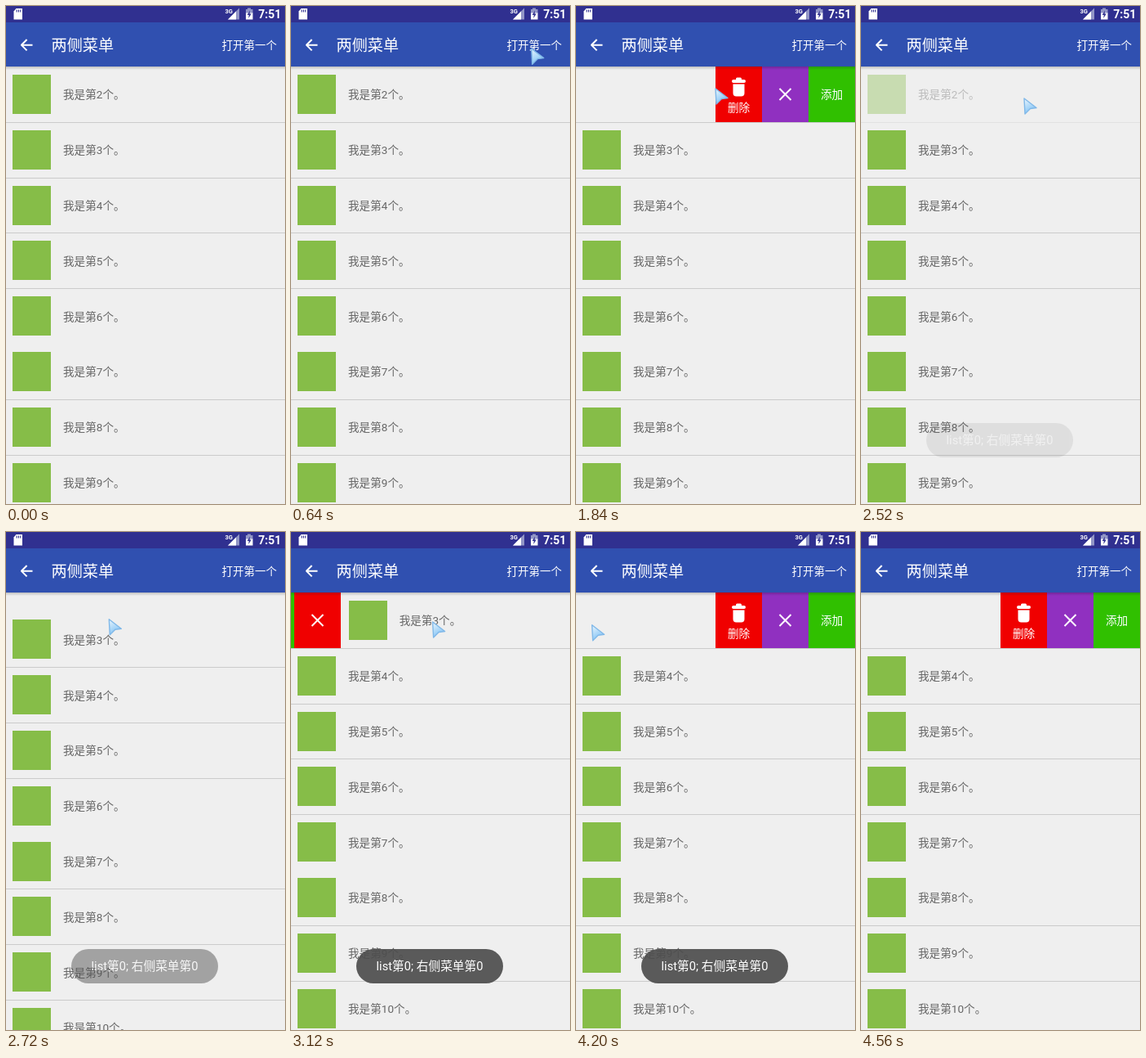
Recreate the animation shown at these times as an HTML page with a canvas. Size 342 px wide and 609 px high, loop 4.76 s.

```html
<!DOCTYPE html>
<html lang="zh-CN">
<head>
<meta charset="utf-8">
<title>两侧菜单</title>
<style>
  html, body { margin: 0; width: 100%; height: 100%; overflow: hidden; background: #efefef; }
  canvas { position: absolute; left: 0; top: 0; width: 342px; height: 609px; }
  #toast {
    position: absolute; left: 80px; top: 510px; width: 180px; height: 42px;
    border-radius: 21px; background: rgba(78, 78, 78, .92); color: #fff;
    font: 14.7px/42px Roboto, "Noto Sans CJK SC", sans-serif;
    text-align: center; white-space: nowrap; opacity: 0;
  }
</style>
</head>
<body>
<canvas id="stage"></canvas>
<div id="toast">list第0; 右侧菜单第0</div>
<script>
const W = 342, H = 609, LOOP = 4760, STEP = 40;
const BAR = 20, TOP = 74, PITCH = 67.8, BTN = 57;
const OPEN_LEFT = 2 * BTN + 2, OPEN_RIGHT = 3 * BTN;
const FONT = 'Roboto, "Noto Sans CJK SC", sans-serif';
const RED = '#f00000', PURPLE = '#9030c0', GREEN = '#30c000';

const canvas = document.getElementById('stage');
const toast = document.getElementById('toast');
const ctx = canvas.getContext('2d');
const dpr = window.devicePixelRatio || 1;
canvas.width = W * dpr;
canvas.height = H * dpr;

const clamp = (v, lo = 0, hi = 1) => Math.max(lo, Math.min(hi, v));
const span = (t, a, b) => clamp((t - a) / (b - a));
const easeOut = u => 1 - (1 - u) ** 3;
const smooth = u => (1 - Math.cos(Math.PI * u)) / 2;

// Pointer gestures: begin, end, destination
const MOVES = [
  [280, 760, 293, 50], [1400, 1680, 132, 110], [1680, 1840, 170, 100],
  [2080, 2200, 199, 112], [2560, 2960, 105, 104], [3050, 3560, 294, 118],
  [3660, 3760, 303, 118], [3840, 4560, -22, 112]
];

function pointerAt(t) {
  let x = 339, y = 123;
  for (const [a, b, toX, toY] of MOVES) {
    const u = easeOut(span(t, a, b));
    x += (toX - x) * u;
    y += (toY - y) * u;
  }
  return [x, y];
}

// Shift of the first row: taps run on their own, drags follow the pointer
function swipeAt(t) {
  const [x] = pointerAt(t);
  if (t < 3040) return OPEN_RIGHT * (easeOut(span(t, 2420, 2480)) - easeOut(span(t, 1010, 1210)));
  if (t < 3660) return clamp(x - 110, 0, OPEN_LEFT);
  if (t < 3840) return OPEN_LEFT * (1 - easeOut(span(t, 3660, 3840)));
  return clamp(x - 290, -OPEN_RIGHT, 0);
}

function text(str, x, y, size, color, align = 'left', weight = 400) {
  ctx.font = `${weight} ${size}px ${FONT}`;
  ctx.fillStyle = color;
  ctx.textAlign = align;
  ctx.fillText(str, x, y);
}

function rect(x, y, w, h, color) {
  ctx.fillStyle = color;
  ctx.fillRect(x, y, w, h);
}

function shape(points, color) {
  ctx.beginPath();
  points.forEach(([x, y]) => ctx.lineTo(x, y));
  ctx.closePath();
  ctx.fillStyle = color;
  ctx.fill();
}

function lines(segments, width) {
  ctx.beginPath();
  for (const [x1, y1, x2, y2] of segments) {
    ctx.moveTo(x1, y1);
    ctx.lineTo(x2, y2);
  }
  ctx.strokeStyle = '#fff';
  ctx.lineWidth = width;
  ctx.stroke();
}

const cross = (x, y) => lines([[x - 7, y - 7, x + 7, y + 7], [x + 7, y - 7, x - 7, y + 7]], 2);
const plus = (x, y) => lines([[x - 8, y, x + 8, y], [x, y - 8, x, y + 8]], 2);

function trash(x, y) {
  ctx.fillStyle = '#fff';
  ctx.beginPath();
  ctx.roundRect(x - 8.5, y + 2.5, 17, 4, 2);
  ctx.roundRect(x - 3.5, y, 7, 4, 1.5);
  ctx.roundRect(x - 7, y + 8, 14, 15, [0, 0, 4, 4]);
  ctx.fill();
}

function row(n, y, dx = 0) {
  rect(Math.round(8 + dx), Math.round(y + 10), 47, 48, '#86bd48');
  text(`我是第${n}个。`, 70 + dx, y + 39.4, 13.6, '#666');
}

function button(x, color) {
  rect(x, TOP, BTN, 68, color);
  return x + BTN / 2;
}

function rightMenu(x, press) {
  const bin = button(x, RED);
  if (press) button(x, `rgba(255,255,255,${0.15 * press})`);
  trash(bin, 87.5);
  text('删除', bin, 128.7, 13.6, '#fff', 'center');
  cross(button(x + BTN, PURPLE), 108);
  text('添加', button(x + 2 * BTN, GREEN), 113, 13.6, '#fff', 'center');
}

function leftMenu(edge) {
  plus(button(edge - 2 * BTN, GREEN), 108);
  cross(button(edge - BTN, RED), 108);
}

function list(t) {
  const gone = smooth(span(t, 2450, 2570));
  const lift = smooth(span(t, 2570, 2820));
  const dx = swipeAt(t);
  const first = lift === 1 ? 3 : 2;

  for (let n = first; n <= 10; n++) {
    const y = TOP + (n - 2 - (n > 2 ? lift : 0)) * PITCH;
    ctx.globalAlpha = n === 2 ? 1 - gone : 1;
    row(n, y, n === first ? dx : 0);
    // The hairline below the fifth row is lost between pixels
    if (n - first !== 4) rect(0, Math.round(y + PITCH), W, 1, '#cbcbcb');
  }
  if (dx < 0) rightMenu(Math.round(W + dx), t < 2440 ? span(t, 2120, 2240) : 0);
  if (dx > 2) leftMenu(Math.round(dx - 2));
}

function statusBar() {
  const back = '#303090', dim = '#9296c6';
  rect(0, 0, W, BAR, back);
  shape([[12.5, 3], [20, 3], [20, 16.5], [9.5, 16.5], [9.5, 6.5]], '#fff');
  for (let i = 0; i < 3; i++) rect(12.6 + i * 2.3, 4.5, 1.1, 3, back);

  text('3G', 268.5, 8.7, 7.5, '#fff', 'left', 700);
  shape([[272, 16.5], [286, 16.5], [286, 2.5]], dim);
  shape([[272, 16.5], [282, 16.5], [282, 6.5]], '#fff');

  rect(296, 2.5, 4, 2, dim);
  rect(294, 4, 8.5, 5, dim);
  rect(294, 8.5, 8.5, 8, '#fff');
  shape([[299, 5.5], [295.7, 11], [297.8, 11], [297.2, 15], [300.7, 9.6], [298.6, 9.6]], back);
  text('7:51', 309.2, 14.8, 14, '#fff', 'left', 700);
}

function appBar(t) {
  const shade = ctx.createLinearGradient(0, TOP, 0, TOP + 4);
  shade.addColorStop(0, 'rgba(0,0,0,.2)');
  shade.addColorStop(1, 'rgba(0,0,0,0)');
  rect(0, TOP, W, 4, shade);
  rect(0, BAR, W, TOP - BAR, '#3050b0');
  lines([[18.5, 47.7, 32.5, 47.7], [25.6, 41, 18.6, 48], [18.6, 47.4, 25.6, 54.4]], 2);
  text('两侧菜单', 55.5, 55.2, 19.2, '#fff', 'left', 500);

  const glow = span(t, 1020, 1080) * (1 - span(t, 1120, 1200));
  ctx.beginPath();
  ctx.arc(298, 47, 19, 0, Math.PI * 2);
  ctx.fillStyle = `rgba(255,255,255,${0.1 * glow})`;
  ctx.fill();
  text('打开第一个', 264.5, 52.8, 13.5, '#fff');
}

function pointer(t) {
  if (t < STEP) return;
  const [x, y] = pointerAt(t);
  ctx.save();
  ctx.translate(x, y);
  const fill = ctx.createLinearGradient(2, 2, 10, 16);
  fill.addColorStop(0, '#e4f3fd');
  fill.addColorStop(1, '#8cc8f6');
  shape([[1, 1], [16, 12.5], [8.5, 13.5], [2, 20]], fill);
  ctx.lineJoin = 'round';
  ctx.lineWidth = 1.4;
  ctx.strokeStyle = '#80b8e8';
  ctx.stroke();
  ctx.restore();
}

function draw(now) {
  const t = Math.floor((now % LOOP) / STEP) * STEP;
  ctx.setTransform(dpr, 0, 0, dpr, 0, 0);
  rect(0, 0, W, H, '#efefef');
  list(t);
  appBar(t);
  statusBar();
  pointer(t);
  toast.style.opacity = span(t, 2465, 2960) * (1 - span(t, 4220, 4560));
}

let start;
function loop(now) {
  start ??= now;
  draw(now - start);
  requestAnimationFrame(loop);
}
draw(0);
requestAnimationFrame(loop);
</script>
</body>
</html>
```
